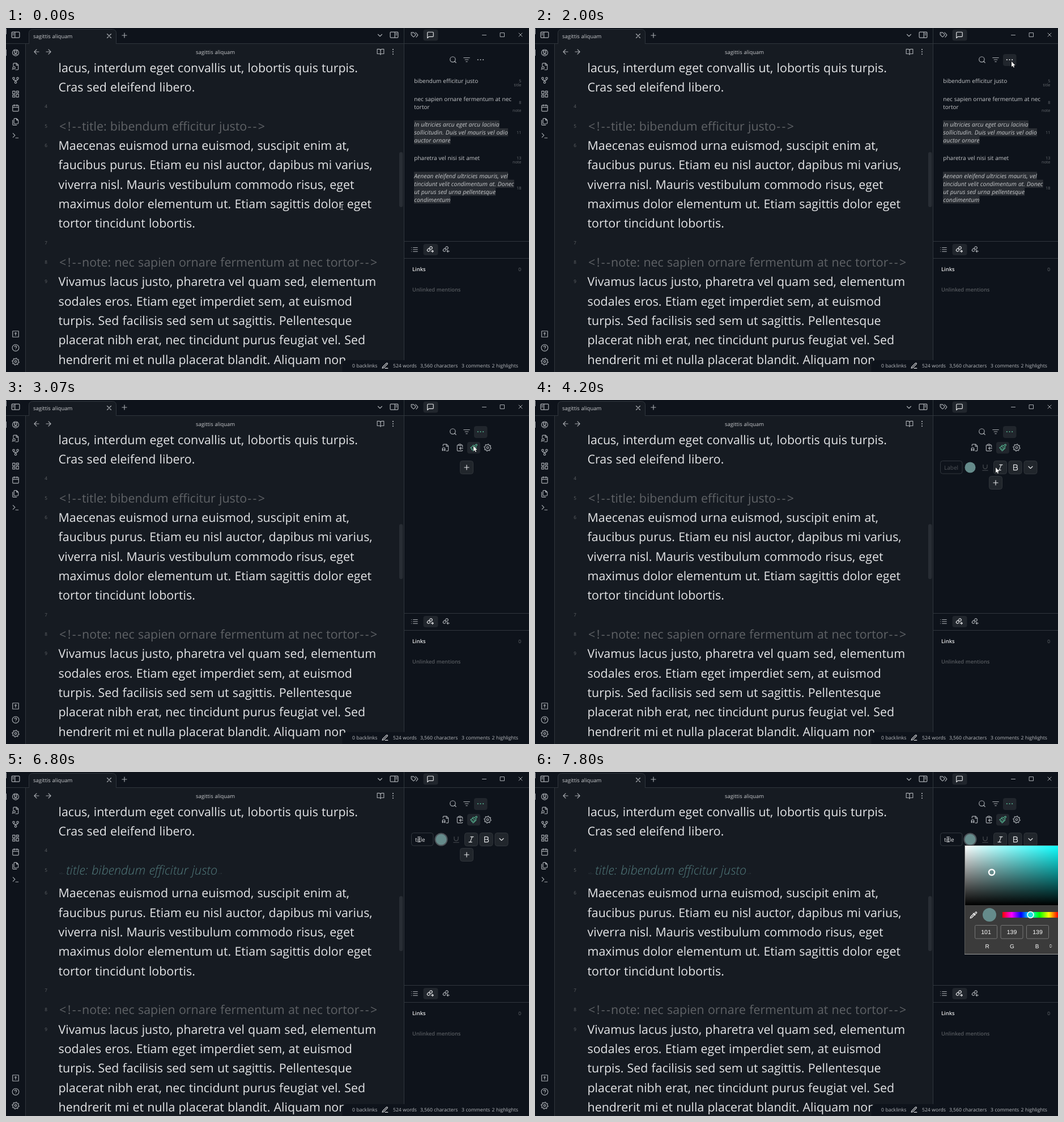
Recreate the animation shown at these times as an HTML page with a canvas. Size 923 px wide and 607 px high, loop 8000 ms.

```html
<!DOCTYPE html>
<html lang="la">
<head>
<meta charset="utf-8">
<style>
html, body { margin: 0; width: 100%; height: 100%; overflow: hidden; background: #0e131b; }
canvas { display: block; }
</style>
</head>
<body>
<canvas id="stage" width="923" height="607"></canvas>
<script>
const ctx = document.getElementById('stage').getContext('2d');
const LOOP = 8000;
const SANS = '"Open Sans", "Noto Sans", sans-serif';
const C = {
  side: '#0e131b', editor: '#161b22', line: '#30363d', text: '#e4e5e7', icon: '#a9adb2',
  dim: '#666a6f', comment: '#5f6266', active: '#21262d', mark: '#2a2e34', teal: '#55b08f', swatch: 'rgb(101,139,139)'
};

// Moments when the interface changes, in ms
const T = { menu: 2270, styles: 2970, addRow: 4070, ibeam: 4900, focus: 5100, caretOff: 5570,
  type: 5870, typed: 6370, apply: 6800, popup: 7330, picker: 7670 };

const ring = (x, y, r) => `M${x - r} ${y}a${r} ${r} 0 1 0 ${2 * r} 0a${r} ${r} 0 1 0 ${-2 * r} 0`;
const gear = () => {
  let d = '';
  for (let i = 0; i < 32; i++) {
    const a = (i - 1.5) / 32 * 2 * Math.PI, r = i % 4 < 2 ? 8 : 10.5;
    d += `${i ? 'L' : 'M'}${12 + r * Math.cos(a)} ${12 + r * Math.sin(a)}`;
  }
  return d + 'z' + ring(12, 12, 3);
};
const link = 'M8.7 11a3.7 3.7 0 0 0 5.6.4l2.2-2.2a3.7 3.7 0 0 0-5.3-5.2l-1.3 1.2M11.3 9.5a3.7 3.7 0 0 0-5.6-.4l-2.2 2.2a3.7 3.7 0 0 0 5.3 5.2l1.3-1.2';
const frame = 'M3 4h18a2 2 0 0 1 2 2v12a2 2 0 0 1-2 2H3a2 2 0 0 1-2-2V6a2 2 0 0 1 2-2z';
const ICONS = {
  panelLeft: frame + 'M10 4v16M4 8h3M4 12h3',
  panelRight: frame + 'M14 4v16M17 8h3M17 12h3',
  close: 'M18 6L6 18M6 6l12 12', plus: 'M12 5v14M5 12h14', minus: 'M5 12h14', square: 'M5 5h14v14H5z',
  down: 'M6 9l6 6 6-6', back: 'M19 12H5M12 19l-7-7 7-7', forward: 'M5 12h14M12 5l7 7-7 7',
  book: 'M2 4h6a4 4 0 0 1 4 4v13a3 3 0 0 0-3-3H2zM22 4h-6a4 4 0 0 0-4 4v13a3 3 0 0 1 3-3h7z',
  dotsV: ring(12, 5, .8) + ring(12, 12, .8) + ring(12, 19, .8),
  dotsH: ring(4, 12, .8) + ring(12, 12, .8) + ring(20, 12, .8),
  tags: 'M9 5H2v7l6.3 6.3a1 1 0 0 0 1.4 0l5.6-5.6a1 1 0 0 0 0-1.4zM6 9h.01M15 5l6.3 6.3a2 2 0 0 1 0 2.8L17 19',
  message: 'M21 15a2 2 0 0 1-2 2H7l-4 4V5a2 2 0 0 1 2-2h14a2 2 0 0 1 2 2z',
  face: ring(12, 12, 9.5) + ring(12, 10, 4) + 'M7 4l2 3M17 4l-2 3M8 17h8',
  fileSearch: 'M5 10V4a2 2 0 0 1 2-2h8l5 5v13a2 2 0 0 1-2 2h-6M14 2v6h6' + ring(7, 16, 3.5) + 'M4.5 18.5L2 21',
  fork: ring(12, 18, 3) + ring(6, 6, 3) + ring(18, 6, 3) + 'M18 9v1a2 2 0 0 1-2 2H8a2 2 0 0 1-2-2V9M12 12v3',
  blocks: 'M3 3h7v8H3zM14 3h7v5h-7zM14 12h7v9h-7zM3 15h7v6H3z',
  calendar: 'M5 4h14a2 2 0 0 1 2 2v14a2 2 0 0 1-2 2H5a2 2 0 0 1-2-2V6a2 2 0 0 1 2-2zM3 10h18M8 2v4M16 2v4',
  files: 'M15 2H9a2 2 0 0 0-2 2v12a2 2 0 0 0 2 2h9a2 2 0 0 0 2-2V7zM15 2v5h5M3 7v13a2 2 0 0 0 2 2h10',
  terminal: 'M4 17l6-6-6-6M12 19h8',
  vault: 'M4 3h16a1 1 0 0 1 1 1v16a1 1 0 0 1-1 1H4a1 1 0 0 1-1-1V4a1 1 0 0 1 1-1z' + ring(12, 10, 2) + 'M12 12v4',
  help: ring(12, 12, 10) + 'M9 9a3 3 0 0 1 6 1c0 2-3 3-3 3M12 17h.01',
  gear: gear(),
  pencil: 'M12 20h9M16.5 3.5a2.1 2.1 0 0 1 3 3L7 19l-4 1 1-4z',
  search: ring(11, 11, 8) + 'M21 21l-4.3-4.3',
  filter: 'M3 6h18M7 12h10M10 18h4',
  list: 'M8 6h13M8 12h13M8 18h13M3 6h.01M3 12h.01M3 18h.01',
  linkOut: link + 'M14 17h7M18 14l3 3-3 3',
  linkIn: link + 'M21 17h-7M17 14l-3 3 3 3',
  fileAudio: 'M4 7V4a2 2 0 0 1 2-2h9l5 5v13a2 2 0 0 1-2 2h-4M14 2v6h6M2 20v-4a4 4 0 0 1 8 0v4M2 17h2v4H2zM8 17h2v4H8z',
  paste: 'M9 2h6v4H9zM15 4h3a2 2 0 0 1 2 2v4M9 4H6a2 2 0 0 0-2 2v14a2 2 0 0 0 2 2h12a2 2 0 0 0 2-2M21 14H11M15 10l-4 4 4 4',
  brush: 'M18.4 2.6L14 7l-1.6-1.6a2 2 0 0 0-2.8 0L8 7l9 9 1.6-1.6a2 2 0 0 0 0-2.8L17 10l4.4-4.4a2.1 2.1 0 0 0-3-3zM9 8c-2 3-4 3.5-7 4l8 10c2-1 6-5 6-7M14.5 17.5L4.5 15',
  underline: 'M6 4v6a6 6 0 0 0 12 0V4M4 21h16',
  italic: 'M19 4h-9M14 20H5M15 4L9 20',
  bold: 'M7 12h8a4 4 0 0 1 0 8H7V4h7a4 4 0 0 1 0 8',
  dropper: 'M2 22l1-4 9-9 3 3-9 9zM11 7l6 6M14 9l4-5a2 2 0 0 1 3 3l-5 4',
  sort: 'M7 9l5-5 5 5M7 15l5 5 5-5'
};
for (const key in ICONS) ICONS[key] = new Path2D(ICONS[key]);

function icon(name, x, y, { size = 14, color = C.icon, width = 2 } = {}) {
  ctx.save();
  ctx.translate(x - size / 2, y - size / 2);
  ctx.scale(size / 24, size / 24);
  ctx.lineWidth = width;
  ctx.lineCap = ctx.lineJoin = 'round';
  ctx.strokeStyle = color;
  ctx.stroke(ICONS[name]);
  ctx.restore();
}

function setFont(size, style = '', gap = 0, family = SANS) {
  ctx.font = `${style} ${size}px ${family}`;
  ctx.letterSpacing = gap + 'px';
  ctx.wordSpacing = size * .03 + 'px';
}

function text(str, x, y, size, { color = C.text, style, align = 'left', gap, family } = {}) {
  setFont(size, style, gap, family);
  ctx.textAlign = align;
  ctx.fillStyle = color;
  ctx.fillText(str, x, y);
  return ctx.measureText(str).width;
}

function box(x, y, w, h, fill, radius = 0, stroke, lineWidth = 1) {
  ctx.beginPath();
  ctx.roundRect(x, y, w, h, radius);
  if (fill) { ctx.fillStyle = fill; ctx.fill(); }
  if (stroke) { ctx.strokeStyle = stroke; ctx.lineWidth = lineWidth; ctx.stroke(); }
}

function disc(x, y, r, fill, stroke, lineWidth) {
  ctx.beginPath();
  ctx.arc(x, y, r, 0, 7);
  if (fill) { ctx.fillStyle = fill; ctx.fill(); }
  if (stroke) { ctx.strokeStyle = stroke; ctx.lineWidth = lineWidth; ctx.stroke(); }
}

const BODY = 21.4;
const PARAGRAPHS = [
  ['', 0, 'lacus, interdum eget convallis ut, lobortis quis turpis.', 'Cras sed eleifend libero.'],
  ['4', 2, ''],
  ['5', 3, '#title: bibendum efficitur justo'],
  ['6', 4, 'Maecenas euismod urna euismod, suscipit enim at,', 'faucibus purus. Etiam eu nisl auctor, dapibus mi varius,',
    'viverra nisl. Mauris vestibulum commodo risus, eget', 'maximus dolor elementum ut. Etiam sagittis dolor eget', 'tortor tincidunt lobortis.'],
  ['7', 9, ''],
  ['8', 10, '#note: nec sapien ornare fermentum at nec tortor'],
  ['9', 11, 'Vivamus lacus justo, pharetra vel quam sed, elementum', 'sodales eros. Etiam eget imperdiet sem, at euismod',
    'turpis. Sed facilisis sed sem ut sagittis. Pellentesque', 'placerat nibh erat, nec tincidunt purus feugiat vel. Sed',
    'hendrerit mi et nulla placerat blandit. Aliquam non']
];

function comment(body, y, styled) {
  if (styled) {
    const faint = { color: '#3d4a50', gap: .4 };
    text('<!--', 94, y, 5.5, faint);
    const w = text(body, 106, y, 22, { color: '#527a7c', style: 'italic 300' });
    text('-->', 107 + w, y, 5.5, faint);
  } else {
    const delimiter = { color: C.comment, gap: 2.4 };
    text('<!--', 94, y, BODY, delimiter);
    const w = text(body, 134, y, BODY, { color: C.comment });
    text('-->', 135 + w, y, BODY, delimiter);
  }
}

function editor(t) {
  const styled = t >= T.apply;
  box(35, 28, 667, 579, C.editor);
  for (const [number, row, ...lines] of PARAGRAPHS) {
    lines.forEach((str, i) => {
      const y = 77.7 + 34.33 * (row + i) + (styled && row > 3 ? 6.3 : 0);
      if (!i) text(number, 73, y - 5, 8.2, { color: C.comment, align: 'right' });
      if (str[0] === '#') comment(str.slice(1), y, styled && row === 3);
      else text(str, 92.5, y, BODY);
    });
  }
  box(694, 219, 6.5, 97, '#282d34', 3);
  icon('back', 54, 42);
  icon('forward', 75, 42);
  text('sagittis aliquam', 369.5, 46, 9.45, { align: 'center', color: '#c4c6c9' });
  icon('book', 661, 42);
  icon('dotsV', 683, 42);
}

function chrome() {
  box(0, 0, 923, 607, C.side);
  box(0, 27, 923, 1, C.line);
  box(34, 28, 1, 579, C.line);
  box(0, 1, 1, 10, '#9a9da2');
  box(0, 38, 1, 11, '#9a9da2');
  box(40.5, 2.5, 154, 30, C.editor, 6, C.line);
  text('sagittis aliquam', 48, 18, 9.45, { color: '#c4c6c9' });
  icon('panelLeft', 17, 12, { size: 15 });
  icon('close', 182, 14);
  icon('plus', 209, 13);
  icon('down', 660, 13);
  icon('panelRight', 685, 12, { size: 15 });
  ['face', 'fileSearch', 'fork', 'blocks', 'calendar', 'files', 'terminal'].forEach((name, i) => icon(name, 17, 43.5 + 24.4 * i));
  ['vault', 'help', 'gear'].forEach((name, i) => icon(name, 17, 540 + 24.3 * i));
}

function sidebarFrame() {
  box(702, 0, 221, 607, C.side);
  box(702, 0, 1, 607, C.line);
  for (const y of [27, 376, 406]) box(702, y, 221, 1, C.line);
  icon('tags', 721, 12);
  box(736.5, 2.5, 26, 20, C.active, 4);
  icon('message', 749, 12.5, { color: C.text });
  icon('minus', 844, 12.5, { size: 12 });
  icon('square', 876, 12, { size: 12 });
  icon('close', 908, 12, { size: 12 });
  icon('list', 721, 391);
  box(736.5, 381, 26, 20, C.active, 4);
  icon('linkOut', 749, 391, { color: C.text });
  icon('linkIn', 777, 391);
  text('Links', 717, 429, 9.4, { style: '600' });
  text('0', 909, 429, 8.5, { align: 'right', color: C.dim });
  text('Unlinked mentions', 717, 465, 9.3, { style: '600', color: '#565a5f' });
}

// First baseline, lines, is highlight, [label, baseline]...
const NOTES = [
  [97, ['bibendum efficitur justo'], false, ['5', 95.8], ['title', 102.6]],
  [128.7, ['nec sapien ornare fermentum at nec', 'tortor'], false, ['8', 134], ['note', 148.2]],
  [173.8, ['In ultricies arcu eget arcu lacinia', 'sollicitudin. Duis vel mauris vel odio', 'auctor ornare'], true, ['11', 186.8]],
  [233, ['pharetra vel nisi sit amet'], false, ['13', 232], ['note', 239]],
  [264.6, ['Aenean eleifend ultricies mauris, vel', 'tincidunt velit condimentum at. Donec', 'ut purus sed urna pellentesque', 'condimentum'], true, ['18', 285]]
];

function noteList(shift, pointer) {
  for (const [base, lines, marked, ...labels] of NOTES) {
    const top = base + shift - 17, height = lines.length * 14 + 13;
    if (pointer.x > 715 && pointer.x < 912 && pointer.y > top && pointer.y < top + height)
      box(715, top, 197, height, '#171c23', 4);
    const size = marked ? 10.45 : 10, style = marked ? 'italic' : '';
    lines.forEach((str, i) => {
      const y = base + shift + 14 * i;
      setFont(size, style);
      if (marked) box(720, y - 10.8, ctx.measureText(str).width + .5, 14, C.mark);
      text(str, 720.3, y, size, { style, color: '#c6c8cb' });
    });
    for (const [str, y] of labels) text(str, 909.3, y + shift, 7.2, { align: 'right', color: C.dim });
  }
}

function button(name, x, y, boxed = true) {
  if (boxed) box(x - 11.5, y - 11.5, 23, 23, '#21262c', 4, '#30353b');
  icon(name, x, y, { color: boxed ? C.text : '#4a4e53' });
}

function styleRow(t) {
  const y = 119, focused = t >= T.focus && t < T.apply;
  const value = 'title'.slice(0, t < T.type ? 0 : t < T.type + 100 ? 2 : t < T.type + 200 ? 4 : 5);
  if (focused) box(715, 107, 39.5, 23.5, C.side, 4, '#555a61', 2);
  else box(715.5, 107.5, 38.5, 22.5, C.side, 4, C.line);
  const w = text(value || 'Label', 722, 122.6, 10, { color: value ? C.text : '#50545a' });
  const caret = focused && (t < T.caretOff || (t >= T.type && t < T.typed));
  if (caret) box(722 + (value ? w : 0), 113, 1, 12, C.text);
  if (t >= T.apply) disc(768, y, 10.5, C.swatch, '#4d5359', 2);
  else disc(768, y, 9.5, C.swatch);
  button('underline', 794.5, y, false);
  button('italic', 821, y);
  button('bold', 847.5, y);
  button('down', 874.5, y);
}

function toolbar(t, pointer) {
  icon('search', 789, 56);
  icon('filter', 813, 56);
  const menu = t >= T.menu, hover = pointer.x > 826 && pointer.y > 46 && pointer.y < 67;
  if (menu || hover) box(826, 46, 23.5, 21, C.active, 4);
  icon('dotsH', 837.5, 56, { color: menu ? C.teal : hover ? C.text : C.icon });
  if (!menu) return;
  icon('fileAudio', 776, 84);
  icon('paste', 801, 84);
  const over = pointer.x > 814 && pointer.x < 837 && pointer.y > 74 && pointer.y < 94;
  if (t >= T.styles || over) box(814, 74, 23, 20.5, C.active, 4);
  icon('brush', 825.5, 84, { color: t >= T.styles ? C.teal : C.icon });
  icon('gear', 850, 84);
}

function statusBar() {
  box(593.5, 586, 335, 30, C.side, [8, 0, 0, 0]);
  const items = [['0 backlinks', 611], ['524 words', 683], ['3,560 characters', 731], ['3 comments', 804], ['2 highlights', 857.5]];
  for (const [str, x] of items) text(str, x, 599.2, 8.65, { color: '#b9bcc0' });
  icon('pencil', 669, 596, { size: 13, color: C.text });
}

function gradient(x0, y0, x1, y1, colors) {
  const g = ctx.createLinearGradient(x0, y0, x1, y1);
  colors.forEach((c, i) => g.addColorStop(i / (colors.length - 1), c));
  return g;
}

function colorPicker(ready) {
  box(758, 129, 165, 193, '#3b3b3b');
  if (!ready) return;
  box(758, 130, 165, 105, gradient(758, 0, 934, 0, ['#fff', '#0ff']));
  box(758, 130, 165, 105, gradient(0, 130, 0, 235, ['rgba(0,0,0,0)', '#000']));
  box(758, 129, 1, 193, '#5a5a5a');
  box(758, 321, 165, 1, '#a0a0a0');
  disc(806, 177, 5, null, '#fff', 2.5);
  icon('dropper', 774, 252, { color: '#fff', size: 14 });
  disc(802, 252, 12, C.swatch);
  box(825, 247, 98, 10, gradient(825, 0, 923, 0, ['#f00', '#f0f', '#00f', '#0ff', '#0f0', '#ff0', '#f00']));
  disc(874.5, 252, 5.5, '#1fdede', '#fff', 1.5);
  const family = '"Liberation Sans", Arial, sans-serif';
  [['101', 'R'], ['139', 'G'], ['139', 'B']].forEach(([value, name], i) => {
    const x = 796 + 45.5 * i;
    box(x - 19.5, 270.5, 39, 23.5, '#3b3b3b', 2, '#777');
    text(value, x, 286, 10.5, { align: 'center', color: '#fff', family });
    text(name, 798 + 44 * i, 311, 10, { align: 'center', color: '#fff', family });
  });
  icon('sort', 910, 307, { size: 8, color: '#fff', width: 3 });
}

// time, x, y
const PATH = [
  [0, 593, 316], [550, 593, 316], [870, 635, 228], [1130, 748, 148], [1370, 815, 104], [1430, 818, 100],
  [1670, 841, 59], [2370, 841, 59], [2770, 825, 81], [3230, 825, 81], [3770, 812, 118], [3800, 813, 119],
  [4370, 813, 119], [4800, 729, 119], [LOOP, 729, 119]
];

function pointerAt(t) {
  const i = PATH.findIndex(p => p[0] > t);
  const [t0, x0, y0] = PATH[i - 1], [t1, x1, y1] = PATH[i];
  const k = (t - t0) / (t1 - t0);
  return { x: x0 + (x1 - x0) * k, y: y0 + (y1 - y0) * k };
}

const ARROW = new Path2D('M0 0v9.4l2.1-1.9 1.5 3.2 1.5-.7-1.5-3.1h2.9z');
const IBEAM = new Path2D('M-2.5-4.5h2l.5.5.5-.5h2M0-4v8M-2.5 4.5h2l.5-.5.5.5h2');

function drawPointer({ x, y }, t) {
  ctx.save();
  ctx.translate(x, y);
  if (x < 702 || t >= T.ibeam) {
    ctx.strokeStyle = '#c9cbce';
    ctx.lineWidth = 1;
    ctx.stroke(IBEAM);
  } else {
    ctx.strokeStyle = '#000';
    ctx.lineWidth = 1;
    ctx.stroke(ARROW);
    ctx.fillStyle = '#fff';
    ctx.fill(ARROW);
  }
  ctx.restore();
}

function draw(now) {
  const t = now % LOOP, pointer = pointerAt(t);
  ctx.textRendering = 'geometricPrecision';
  chrome();
  editor(t);
  sidebarFrame();
  toolbar(t, pointer);
  if (t < T.styles) noteList(t < T.menu ? 0 : 27.5, pointer);
  else button('plus', 813, t < T.addRow ? 119 : 146);
  if (t >= T.addRow) styleRow(t);
  statusBar();
  if (t >= T.popup) colorPicker(t >= T.picker);
  drawPointer(pointer, t);
}

const start = performance.now();
(function tick() {
  draw(performance.now() - start);
  requestAnimationFrame(tick);
})();
</script>
</body>
</html>
```
